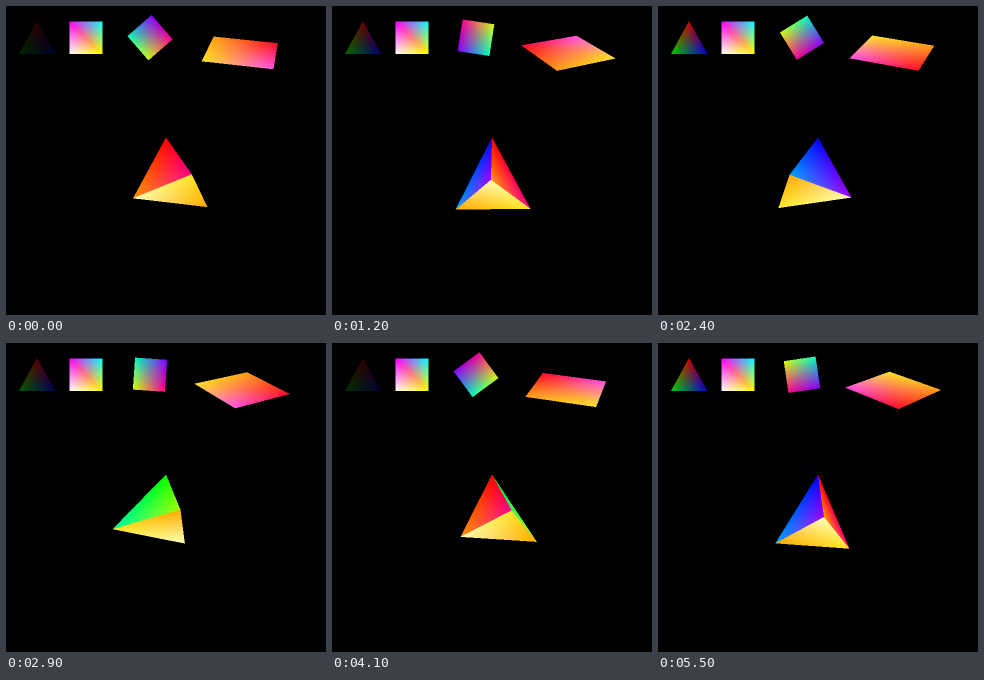
Recreate the animation shown at these times as an HTML page with a canvas. Size 320 px wide and 309 px high, loop 5.6 s.

```html
<!DOCTYPE html>
<html lang="en">
<head>
<meta charset="utf-8">
<title>Gradient shapes</title>
<style>
html, body { margin: 0; width: 100%; height: 100%; overflow: hidden; background: #000; }
canvas { display: block; width: 320px; height: 309px; }
</style>
</head>
<body>
<canvas id="stage" width="640" height="618"></canvas>
<script>
const STEP = 100, STEPS = 56;
const SCALE = 2; // oversampling, smooths the edges
const ctx = document.getElementById('stage').getContext('2d');
const { width: W, height: H } = ctx.canvas;
const image = ctx.createImageData(W, H);
const rad = deg => deg * Math.PI / 180;
const vertex = (x, y, color) => ({ x: x * SCALE, y: y * SCALE, color });
const cross = (a, b, x, y) => (b.x - a.x) * (y - a.y) - (b.y - a.y) * (x - a.x);

const RED = [255, 0, 0], GREEN = [0, 255, 0], BLUE = [0, 0, 255];
const MAGENTA = [255, 0, 255], YELLOW = [255, 255, 0], CYAN = [0, 255, 255];
const WHITE = [255, 255, 255], ORANGE = [255, 150, 0], ROSE = [255, 0, 140];
const VIOLET = [165, 0, 255], AZURE = [0, 165, 255];
const SPRING = [0, 255, 165], LIME = [165, 255, 0];
const GOLD = [255, 230, 40], AMBER = [255, 170, 0], CREAM = [255, 255, 185];

// Fills a triangle, blending the three corner colours.
function shade(a, b, c) {
  const area = cross(a, b, c.x, c.y);
  if (!area) return;
  const xs = [a.x, b.x, c.x], ys = [a.y, b.y, c.y];
  const right = Math.min(W, Math.ceil(Math.max(...xs)));
  const bottom = Math.min(H, Math.ceil(Math.max(...ys)));
  for (let y = Math.max(0, Math.floor(Math.min(...ys))); y < bottom; y++) {
    for (let x = Math.max(0, Math.floor(Math.min(...xs))); x < right; x++) {
      const u = cross(b, c, x + .5, y + .5) / area;
      const v = cross(c, a, x + .5, y + .5) / area;
      const w = 1 - u - v;
      if (u < 0 || v < 0 || w < 0) continue;
      const at = (y * W + x) * 4;
      for (let i = 0; i < 3; i++) {
        image.data[at + i] = u * a.color[i] + v * b.color[i] + w * c.color[i];
      }
    }
  }
}

function shadeQuad(corners, cx, cy) {
  const mean = [0, 1, 2].map(i => corners.reduce((sum, p) => sum + p.color[i], 0) / 4);
  const center = vertex(cx, cy, mean);
  corners.forEach((p, i) => shade(center, p, corners[(i + 1) % 4]));
}

function drawTriangle(n) {
  const wave = .5 - .5 * Math.cos((n - 4.5) * .2);
  const light = Math.max(0, .95 * wave - .035);
  const dim = color => color.map(v => v * light);
  shade(vertex(31, 15, dim(RED)), vertex(13, 48, dim(GREEN)), vertex(49.5, 48, dim(BLUE)));
}

function drawSquare() {
  const topLeft = vertex(63.7, 15.7, MAGENTA), bottomRight = vertex(96.3, 48.1, YELLOW);
  shade(topLeft, bottomRight, vertex(96.3, 15.7, CYAN));
  shade(topLeft, bottomRight, vertex(63.7, 48.1, WHITE));
}

function drawSpinner(n) {
  const cx = 144, cy = 31.7;
  const colors = [ROSE, [210, 255, 20], [0, 255, 190], [128, 0, 255]];
  shadeQuad(colors.map((color, i) => {
    const a = rad(4 - 10.862 * n + 90 * i);
    return vertex(cx + 22.7 * Math.cos(a), cy + 22.7 * Math.sin(a), color);
  }), cx, cy);
}

function drawPlane(n) {
  const cx = 235.6, cy = 45.8;
  const colors = [[255, 80, 230], GOLD, [255, 160, 20], [255, 10, 40]];
  shadeQuad(colors.map((color, i) => {
    const a = rad(52 - 10.862 * n + 90 * i);
    const cos = Math.cos(a), sin = Math.sin(a);
    const scale = 1 / (1 - .085 * sin);
    return vertex(cx + 48.2 * cos * scale, cy + (2.9 * cos + 18.4 * sin) * scale, color);
  }), cx, cy);
}

function drawPyramid(n) {
  const angle = rad(75 + 8.62 * n);
  const cos = Math.cos(angle), sin = Math.sin(angle);
  const half = Math.sqrt(3) / 2;
  const project = (x, z, color) => {
    const depth = z * cos - x * sin;
    const scale = 40.2 / (1 - .083 * depth);
    return vertex(160 + (x * cos + z * sin) * scale, 188.5 - 17 * depth, color);
  };
  const a = project(-1, half, GOLD);
  const b = project(1, half, AMBER);
  const c = project(0, -half, CREAM);
  const face = (p, q, top, left, right) => {
    const apex = vertex(160, 131.5, top);
    if (cross(apex, p, q.x, q.y) < 0) {
      shade(apex, { ...p, color: left }, { ...q, color: right });
    }
  };
  face(a, b, GREEN, SPRING, LIME);
  face(b, c, BLUE, AZURE, VIOLET);
  face(c, a, RED, ORANGE, ROSE);
  shade(a, b, c);
}

function render(n) {
  new Uint32Array(image.data.buffer).fill(0xff000000);
  [drawTriangle, drawSquare, drawSpinner, drawPlane, drawPyramid].forEach(draw => draw(n));
  ctx.putImageData(image, 0, 0);
}

let start, shown = -1;
function tick(now) {
  start ??= now;
  const n = Math.floor((now - start) / STEP) % STEPS;
  if (n !== shown) render(shown = n);
  requestAnimationFrame(tick);
}
render(0);
requestAnimationFrame(tick);
</script>
</body>
</html>
```
